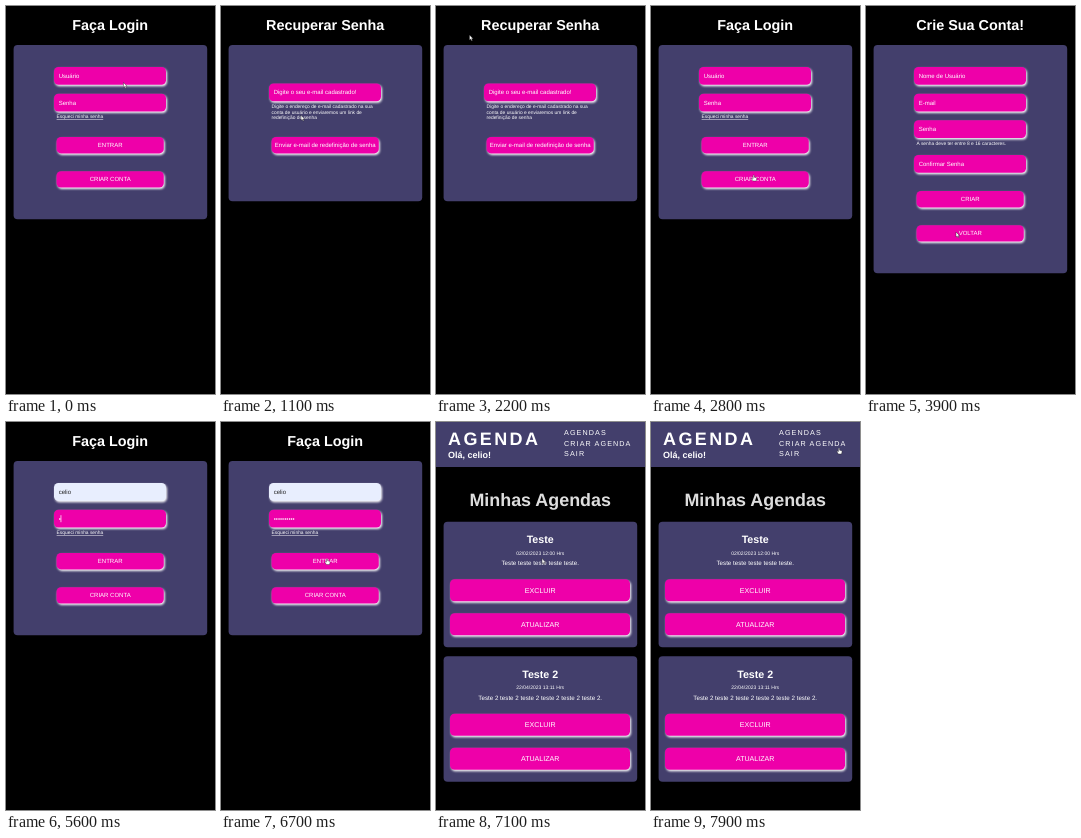
Animation of 209x388 px, one loop 8 s. Source, as an HTML page:

```html
<!DOCTYPE html>
<html lang="pt">
<head>
<meta charset="utf-8">
<style>
  html, body { margin: 0; width: 100%; height: 100%; overflow: hidden; background: #000; }
  svg { display: block; width: 209px; height: 388px; }
  text { font-family: "Liberation Sans", Arial, sans-serif; fill: #fff; text-rendering: geometricPrecision; white-space: pre; }
  .b { font-weight: bold; }
  .u { text-decoration: underline; }
  .panel { fill: #433f6c; }
  .pink { fill: #ee00a9; }
  .glow { fill: #fff; filter: blur(1.1px); }
</style>
</head>
<body>
<svg id="stage" viewBox="0 0 209 388"></svg>
<script>
const LOOP = 8000, USER = 'celio', SECRET = '•'.repeat(10);

const text = (s, x, y, size, cls = '', more = '') =>
  `<text x="${x}" y="${y}" font-size="${size}" class="${cls}" ${more}>${s}</text>`;
const mid = (s, y, size, cls = '', more = '') => text(s, 104.2, y, size, cls, 'text-anchor="middle" ' + more);
const box = (x, y, w, h, r, cls, more = '') =>
  `<rect x="${x}" y="${y}" width="${w}" height="${h}" rx="${r}" class="${cls}" ${more}/>`;
const panel = (y, bottom) => box(7.6, y, 193.6, bottom - y, 4, 'panel');
const pink = (x, y, w, h, more) =>
  box(x + 1, y + 1.5, w, h, 4.5, 'glow') + box(x, y, w, h, 4.5, 'pink', more);
const field = (s, y, id = '') =>
  pink(48, y, 112, 17.8, id && `id="${id}Box"`) + text(s, 52.7, y + 10.8, 6, '', id && `id="${id}"`);
const button = (s, y) => pink(50.5, y, 107.3, 16.4) + mid(s, y + 10.2, 6);
const wide = (s, y) => pink(14, y, 180, 22) + mid(s, y + 13.4, 7.1);
const note = (s, y, cls) => text(s, 50.6, y, 4.88, cls);
const form = (title, bottom, body) => mid(title, 23.9, 14.4, 'b') + panel(39, bottom) + body;
const card = (y, title, date, body) => panel(y, y + 125.5) + mid(title, y + 21.3, 10.7, 'b') +
  mid(date, y + 32.8, 5) + mid(body, y + 43.7, 6.22) + wide('EXCLUIR', y + 57.5) + wide('ATUALIZAR', y + 91.5);

const pages = {
  login: form('Faça Login', 213.2,
    field('Usuário', 61, 'user') + field('Senha', 87.7, 'pass') + note('Esqueci minha senha', 112.2, 'u') +
    button('ENTRAR', 131) + button('CRIAR CONTA', 165.2) +
    '<rect id="caret" width=".7" height="7"/>'),
  recover: form('Recuperar Senha', 195.2,
    field('Digite o seu e-mail cadastrado!', 77.5) +
    note('Digite o endereço de e-mail cadastrado na sua', 102) +
    note('conta de usuário e enviaremos um link de', 107.5) +
    note('redefinição de senha', 113) +
    button('Enviar e-mail de redefinição de senha', 131)),
  create: form('Crie Sua Conta!', 267.2,
    field('Nome de Usuário', 61) + field('E-mail', 87.7) + field('Senha', 114.3) +
    note('A senha deve ter entre 8 e 16 caracteres.', 139.2) +
    field('Confirmar Senha', 149) + button('CRIAR', 185) + button('VOLTAR', 219.2)),
  agenda: box(0, 0, 209, 45, 0, 'panel') +
    text('AGENDA', 12, 23.3, 18, 'b', 'letter-spacing="2.4"') +
    text(`Olá, ${USER}!`, 12, 36.2, 9, 'b') +
    ['AGENDAS', 'CRIAR AGENDA', 'SAIR'].map((s, i) =>
      text(s, 128, 13.2 + i * 10.3, 7.2, '', 'letter-spacing="1.1"')).join('') +
    mid('Minhas Agendas', 84, 17.9, 'b', 'style="fill:#ddd"') +
    card(99.7, 'Teste', '02/02/2023 12:00 Hrs', 'Teste teste teste teste teste.') +
    card(234.3, 'Teste 2', '22/04/2023 13:11 Hrs', 'Teste 2 teste 2 teste 2 teste 2 teste 2 teste 2.')
};

const $ = id => document.getElementById(id);
$('stage').innerHTML = Object.entries(pages).map(([id, s]) => `<g id="${id}">${s}</g>`).join('') +
  `<g id="cursor" fill="#fff" stroke="#222" stroke-width=".4">
    <path id="arrow" d="M0 0V5L1.2 4L2 5.8L2.9 5.4L2.1 3.7H3.6Z"/>
    <path id="hand" d="M-.6 .6Q0 -.4 .6 .6V2.2L2.6 2.7Q3.2 3 3 4L2.5 6H-.6L-2.2 3.6Q-1.8 2.8 -.6 3.6Z"/>
  </g>`;

const scenes = [[0, 'login'], [1100, 'recover'], [2450, 'login'], [3200, 'create'], [4250, 'login'], [7100, 'agenda']];
// time, x, y of the pointer tip
const path = [[0, 117.5, 76.5], [100, 117, 78], [700, 80, 109], [1800, 80, 110], [2200, 33.5, 29],
  [2400, 14, -7], [2500, 14, -7], [2800, 102.7, 169], [3100, 102.7, 169], [3700, 90, 226], [4250, 90, 226],
  [4600, 80, 70], [6400, 121, 102], [6700, 106, 136.5], [7150, 106, 136.5], [7850, 188, 26], [8000, 188, 26]];
const hands = [[650, 1100], [2750, 3200], [6600, 7100], [7750, 8000]];

const within = (t, [a, b]) => t >= a && t < b;
const typed = (s, t, from, to) =>
  s.slice(0, Math.max(0, Math.min(s.length, Math.floor((t - from) / (to - from) * s.length))));
const show = (id, on) => $(id).style.display = on ? '' : 'none';

function pointer(t) {
  const i = path.findIndex(p => p[0] > t);
  const [t0, x0, y0] = path[i - 1], [t1, x1, y1] = path[i];
  const k = (t - t0) / (t1 - t0), e = k * k * (3 - 2 * k);
  return [x0 + (x1 - x0) * e, y0 + (y1 - y0) * e];
}

function login(t) {
  const name = typed(USER, t, 4800, 5300), secret = typed(SECRET, t, 5450, 6450);
  const filled = t >= 5300, inPass = t >= 5400;
  $('user').textContent = name || 'Usuário';
  $('pass').textContent = secret || 'Senha';
  $('user').style.fill = filled ? '#222' : '#fff';
  $('userBox').style.fill = filled ? '#e8eefe' : '';
  const caretOn = within(t, [4600, 6550]);
  show('caret', caretOn);
  if (!caretOn) return;
  const value = inPass ? secret : name;
  $('caret').setAttribute('x', 52.5 + (value && $(inPass ? 'pass' : 'user').getComputedTextLength()));
  $('caret').setAttribute('y', inPass ? 93.2 : 66.5);
  $('caret').setAttribute('fill', filled && !inPass ? '#222' : '#fff');
}

function draw(now) {
  const t = now % LOOP;
  const page = scenes.filter(s => s[0] <= t).pop()[1];
  for (const id in pages) show(id, id === page);
  if (page === 'login') login(t);
  const hand = hands.some(h => within(t, h));
  show('hand', hand);
  show('arrow', !hand);
  show('cursor', !within(t, [4600, 6400]));
  $('cursor').setAttribute('transform', `translate(${pointer(t)})`);
}

const start = performance.now();
function tick() {
  draw(performance.now() - start);
  requestAnimationFrame(tick);
}
tick();
</script>
</body>
</html>
```
